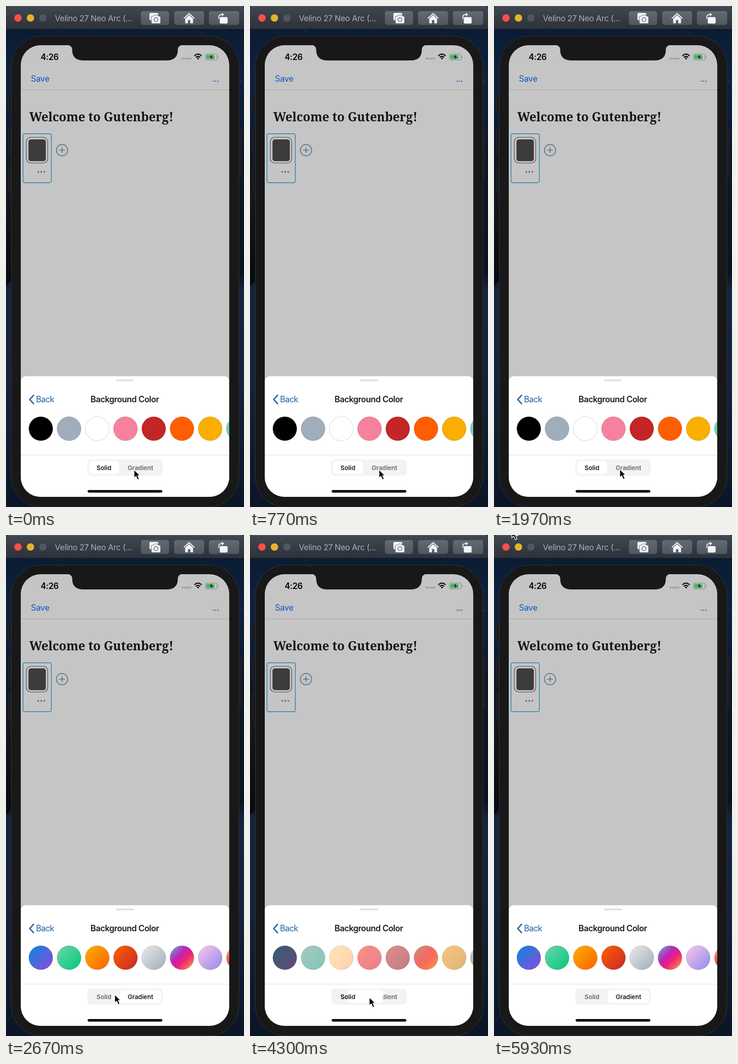
These frames come from a looping animation (516 by 1086 pixels, 5960 ms). An HTML page:

```html
<!DOCTYPE html>
<html lang="en">
<head>
<meta charset="utf-8">
<title>Background color picker</title>
<style>
  html, body { margin: 0; width: 100%; height: 100%; overflow: hidden; background: #0d1a2c; }
  svg { display: block; width: 516px; height: 1086px; overflow: hidden; }
  text { font-family: Inter, "Liberation Sans", sans-serif; font-size: 18px; letter-spacing: -.4px; white-space: pre; }
  .semi { font-weight: 600; }
  .tab { font-size: 13.5px; font-weight: 600; letter-spacing: -.1px; }
  .heading { font: 700 26.2px "Noto Serif", serif; letter-spacing: 0; }

  #solids, #gradients, #pill, #onSolid, #onGradient, #cursor { animation: 5960ms infinite ease-in-out; }
  #solids { animation-name: fadeSolids; }
  #gradients { animation-name: fadeGradients; }
  #pill { animation-name: slide; }
  #onSolid { animation-name: solidActive; animation-timing-function: step-end; }
  #onGradient { animation-name: gradientActive; animation-timing-function: step-end; }
  #cursor { animation-name: point; }

  @keyframes fadeSolids {
    0%, 15.1%, 28.52%, 34.73%, 61.24%, 70.89% { opacity: 1; }
    18.46%, 25.17%, 38.09%, 57.89%, 74.25%, 100% { opacity: 0; }
  }
  @keyframes fadeGradients {
    0%, 15.1%, 28.52%, 34.73%, 61.24%, 70.89% { opacity: 0; }
    18.46%, 25.17%, 38.09%, 57.89%, 74.25%, 100% { opacity: 1; }
  }
  @keyframes slide {
    0%, 13.93%, 29.03%, 33.56%, 61.66%, 69.71% { x: 180px; width: 65px; }
    18.96%, 23.99%, 38.59%, 56.63%, 74.75%, 100% { x: 247px; width: 89px; }
  }
  @keyframes solidActive {
    0%, 29.03%, 61.66% { opacity: 1; }
    18.96%, 38.59%, 74.75%, 100% { opacity: 0; }
  }
  @keyframes gradientActive {
    0%, 29.03%, 61.66% { opacity: 0; }
    18.96%, 38.59%, 74.75%, 100% { opacity: 1; }
  }
  @keyframes point {
    0% { transform: translate(277px, 1004px); }
    4.2% { transform: translate(275px, 1010px); }
    12.92% { transform: translate(279px, 1004px); }
    16.8% { transform: translate(278px, 1005px); }
    22.99% { transform: translate(226px, 1003px); }
    26.85% { transform: translate(222px, 1006px); }
    32.7% { transform: translate(272px, 1003px); }
    36.9% { transform: translate(274px, 1002px); }
    44.8% { transform: translate(235px, 995px); }
    53.7% { transform: translate(220px, 999px); }
    57.9% { transform: translate(222px, 1000px); }
    60.9% { transform: translate(265px, 998px); }
    67.1% { transform: translate(274px, 1002px); }
    70.5% { transform: translate(270px, 1002px); }
    72.15% { transform: translate(258px, 1001px); }
    74.7% { transform: translate(250px, 1000px); }
    80.5% { transform: translate(300px, 852px); }
    85.6% { transform: translate(425px, 890px); }
    90.6% { transform: translate(451px, 918px); }
    99.4%, 100% { transform: translate(38px, -13px); }
  }
</style>
</head>
<body>
<svg viewBox="0 0 516 1086">
  <defs id="defs">
    <linearGradient id="sky" x2="0" y2="1">
      <stop offset="0" stop-color="#0a1a2e"/>
      <stop offset=".15" stop-color="#0d2140"/>
      <stop offset=".3" stop-color="#0c1829"/>
      <stop offset=".53" stop-color="#0a1320"/>
      <stop offset=".57" stop-color="#14253f"/>
      <stop offset=".75" stop-color="#13233b"/>
      <stop offset="1" stop-color="#0b1526"/>
    </linearGradient>
    <linearGradient id="rock" x2="0" y2="1">
      <stop offset="0" stop-color="#111722" stop-opacity="0"/>
      <stop offset=".3" stop-color="#14171d"/>
      <stop offset="1" stop-color="#06090e"/>
    </linearGradient>
    <linearGradient id="bar" x2="0" y2="1">
      <stop offset="0" stop-color="#414750"/>
      <stop offset="1" stop-color="#2c313a"/>
    </linearGradient>
    <linearGradient id="button" x2="0" y2="1">
      <stop offset="0" stop-color="#646a74"/>
      <stop offset="1" stop-color="#515760"/>
    </linearGradient>
    <clipPath id="screen"><rect x="32" y="85" width="452" height="979" rx="43"/></clipPath>
  </defs>

  <!-- Desktop -->
  <rect width="516" height="1086" fill="url(#sky)"/>
  <path d="M0 330L12 350V596L0 606Z" fill="url(#rock)"/>
  <g fill="#8ea1b8" opacity=".6">
    <circle cx="119" cy="55" r=".8"/><circle cx="422" cy="58" r=".7"/><circle cx="508" cy="163" r=".9"/>
    <circle cx="8" cy="132" r=".7"/><circle cx="479" cy="76" r=".7"/>
  </g>

  <!-- Title bar -->
  <path d="M0 50V5Q0 0 5 0H511Q516 0 516 5V50Z" fill="url(#bar)"/>
  <path d="M4 .5H512" stroke="#5d636d"/>
  <path d="M0 50.5H516" stroke="#10151d"/>
  <circle cx="26" cy="26" r="8" fill="#fc4f47"/>
  <circle cx="53" cy="26" r="8" fill="#e5b32b"/>
  <circle cx="80" cy="26" r="8" fill="#505661"/>
  <text x="106" y="32.5" fill="#a9b0bb" style="font-size:17.5px;letter-spacing:-.35px">Velino 27 Neo Arc (...</text>
  <g fill="url(#button)">
    <rect x="292.5" y="11" width="61" height="30" rx="5"/>
    <rect x="364.5" y="11" width="65" height="30" rx="5"/>
    <rect x="440" y="11" width="65.500" height="30" rx="5"/>
  </g>
  <g fill="#f4f5f6">
    <rect x="311" y="15" width="19" height="16" rx="2.500"/>
    <path d="M317 22h3l2-2.500h6l2 2.500h3q2 0 2 2v12q0 2-2 2h-16q-2 0-2-2v-12q0-2 2-2Z" stroke="#5a606a"/>
    <circle cx="325" cy="29.500" r="4.300" fill="none" stroke="#5a606a" stroke-width="1.500"/>
    <path d="M385.500 27L397 16.500L408.500 27" fill="none" stroke="#f4f5f6" stroke-width="2.200"/>
    <path d="M388.500 27.500L397 19.800L405.500 27.500V37.500H399.500V30.500H394.500V37.500H388.500Z"/>
    <rect x="463.500" y="24" width="17" height="14" rx="2.500"/>
    <path d="M461.500 28V24Q461.500 18.500 467 18.500H469" fill="none" stroke="#f4f5f6" stroke-width="2"/>
    <path d="M468 14.500L473 18.500L468 22.500Z"/>
  </g>

  <!-- Phone -->
  <g fill="#191a1c" stroke="#2b2d30" stroke-width=".8">
    <rect x="5.500" y="194" width="9" height="37" rx="2"/>
    <rect x="5.500" y="263" width="9" height="66" rx="2"/>
    <rect x="5.500" y="338" width="9" height="65" rx="2"/>
    <rect x="501" y="263" width="8.500" height="110" rx="2"/>
  </g>
  <rect x="11.500" y="65" width="493.500" height="1021" rx="66" fill="#181818" stroke="#34363a"/>

  <g clip-path="url(#screen)">
    <rect x="32" y="85" width="452" height="979" fill="#c5c5c5"/>
    <path d="M133 84Q143.500 86 143.500 95Q143.500 118 168 118H348Q372.500 118 372.500 95Q372.500 86 383 84Z" fill="#181818"/>

    <!-- Status bar -->
    <text class="semi" x="75" y="116.500" style="font-size:18px">4:26</text>
    <g fill="#999">
      <circle cx="383" cy="114" r="2.200"/><circle cx="388.500" cy="114" r="2.200"/>
      <circle cx="394" cy="114" r="2.200"/><circle cx="399.300" cy="114" r="2.200"/>
    </g>
    <g fill="none" stroke="#111" stroke-width="2.600">
      <path d="M408.500 108Q416.300 100.500 424 108"/>
      <path d="M411.500 111.300Q416.300 107 421 111.300"/>
      <path d="M413.600 113L416.300 116.200L419 113Q416.300 111.200 413.600 113Z" fill="#111" stroke="none"/>
    </g>
    <rect x="432.500" y="104" width="25.500" height="13" rx="3.800" fill="none" stroke="#808080" stroke-width="1.200"/>
    <path d="M459.500 108.500Q462 110.500 459.500 112.500Z" fill="#808080"/>
    <rect x="434.500" y="106" width="17.500" height="9" rx="2" fill="#2fc152"/>
    <path d="M447.500 103.500L440 111.300H444.500L442.800 117.500L450.500 109.500H446Z" fill="#111" stroke="#c5c5c5" stroke-width=".8"/>

    <!-- Editor -->
    <text x="54" y="164" fill="#0f58c4">Save</text>
    <g fill="#0f58c4">
      <circle cx="449.500" cy="163" r="1.300"/><circle cx="454.500" cy="163" r="1.300"/><circle cx="459.500" cy="163" r="1.300"/>
    </g>
    <path d="M32 181.500H484" stroke="#a6a6a6"/>
    <text class="heading" x="50.500" y="249.500" fill="#151515">Welcome to Gutenberg!</text>
    <rect x="36.800" y="277" width="61.500" height="106" rx="3.500" fill="none" stroke="#207fae" stroke-width="1.400"/>
    <rect x="44" y="284.500" width="46.500" height="56" rx="10" fill="none" stroke="#444" stroke-width="1.200"/>
    <rect x="49.300" y="289.800" width="36.500" height="46" rx="4.500" fill="#3c3c3c" stroke="#2c2c2c"/>
    <g fill="#5b7790">
      <circle cx="70" cy="359.500" r="2"/><circle cx="76.500" cy="359.500" r="2"/><circle cx="83" cy="359.500" r="2"/>
    </g>
    <g fill="none" stroke="#62798c" stroke-width="2">
      <circle cx="121.500" cy="312.500" r="12.200"/>
      <path d="M115.500 312.500H127.500M121.500 306.500V318.500"/>
    </g>

    <!-- Bottom sheet -->
    <rect x="32" y="802.500" width="452" height="300" rx="11" fill="#fff"/>
    <rect x="238.500" y="809.300" width="39" height="4.400" rx="2.200" fill="#e3e3e3"/>
    <path d="M60.500 843L51.500 853L60.500 863" fill="none" stroke="#1f64a6" stroke-width="2.700"/>
    <text x="65" y="859" fill="#1f64a6" style="letter-spacing:-.7px">Back</text>
    <text class="semi" x="257.500" y="859" text-anchor="middle" fill="#1c1c1e" style="letter-spacing:-.5px">Background Color</text>
    <g id="solids" stroke="#000" stroke-opacity=".17"></g>
    <g id="gradients" stroke="#000" stroke-opacity=".17"></g>
    <path d="M32 973.500H484" stroke="#dedede"/>

    <!-- Tabs -->
    <rect x="176" y="983" width="164" height="35" rx="8" fill="#f3f3f3"/>
    <g fill="#66686b">
      <text class="tab" x="196.300" y="1005.500">Solid</text>
      <text class="tab" x="263.800" y="1005.500">Gradient</text>
    </g>
    <rect id="pill" x="180" y="986.500" width="65" height="28" rx="7" fill="#fff"/>
    <g fill="#1d1d1f">
      <text id="onSolid" class="tab" x="196.300" y="1005.500">Solid</text>
      <text id="onGradient" class="tab" x="263.800" y="1005.500">Gradient</text>
    </g>
    <rect x="177" y="1049.300" width="162" height="5.400" rx="2.700" fill="#000"/>
  </g>

  <path id="cursor" d="M.6 1V19L4.900 15.300L8.300 23L11.800 21.500L8.500 14H13.800Z" fill="#000" stroke="#fff" stroke-width="1.400"/>
</svg>
<script>
  const solids = ['#000', '#a0adba', '#fff', '#f7809c', '#c42526', '#fe5e00', '#faae00', '#6ed3ae'];
  const gradients = [
    ['#0689df', '#9148da'],
    ['#70d5ae', '#00c878'],
    ['#fbb000', '#ff6000'],
    ['#ff6000', '#c62728'],
    ['#ebebeb', '#9eadba'],
    ['#43e2d5', '#8d6cca', '#c620b2', '#ec2179', '#fa6058', '#fdf543'],
    ['#fec5e8', '#8e8bec'],
    ['#fec59a', '#fd2626', '#620036']
  ];
  const el = id => document.getElementById(id);
  const swatch = (fill, i) => `<circle cx="${75.5 + 61.2 * i}" cy="916.3" r="26" fill="${fill}"/>`;
  const gradient = (colors, i) => `<linearGradient id="g${i}" x2="1" y2="1">` +
    colors.map((c, k) => `<stop offset="${k / (colors.length - 1)}" stop-color="${c}"/>`).join('') +
    '</linearGradient>';

  el('defs').innerHTML += gradients.map(gradient).join('');
  el('solids').innerHTML = solids.map(swatch).join('');
  el('gradients').innerHTML = gradients.map((_, i) => swatch(`url(#g${i})`, i)).join('');
</script>
</body>
</html>
```
